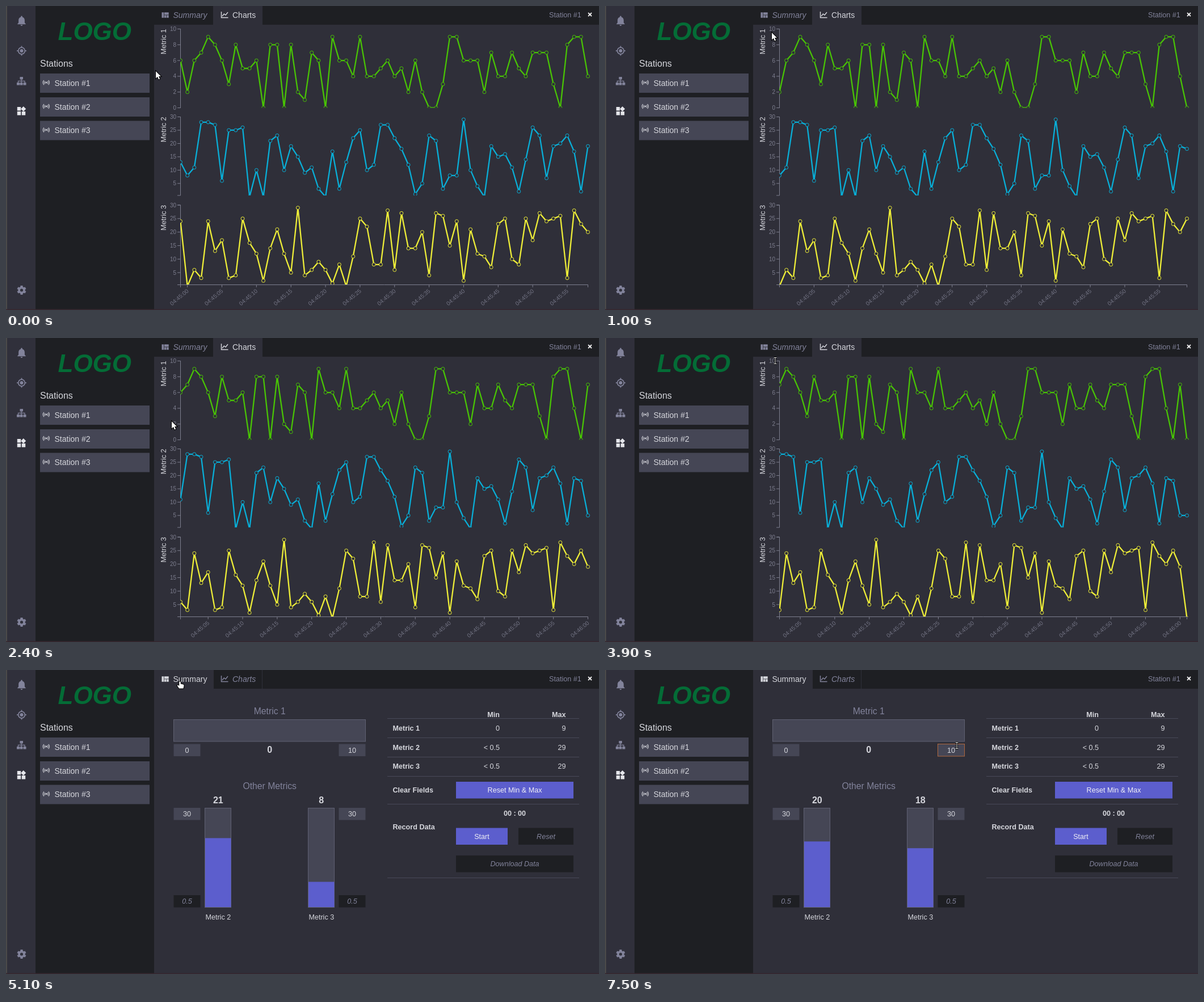
These frames come from a looping animation (1045x536 px, 8000 ms). An HTML page with a canvas:

```html
<!DOCTYPE html>
<html lang="en">
<head>
<meta charset="utf-8">
<title>Station dashboard</title>
<style>
  html, body { margin: 0; width: 100%; height: 100%; overflow: hidden; background: #2f2f39; }
  canvas { display: block; width: 1045px; height: 536px; }
</style>
</head>
<body>
<canvas id="stage" width="1045" height="536"></canvas>
<script>
const ctx = document.getElementById('stage').getContext('2d');
const LOOP = 8000, STEP = 100, SUMMARY_AT = 5100;
const FONT = '"Liberation Sans", Arial, sans-serif';
const BG = '#2f2f39', DARK = '#1e1f23', SLATE = '#454655', EDGE = '#5f6072',
      TEXT = '#d6d7dd', MUTED = '#82839b', AXIS = '#7d7e8e', PURPLE = '#5c5ecd';

// One reading per second, starting at 04:44:59
const metric1 = [6,2,6,7,9,8,6,3,8,5,5,6,0,8,8,0,8,2,1,7,6,0,9,6,6,4,9,4,4,5,6,4,
  5,2,6,2,0,0,3,9,9,6,6,6,2,7,4,4,7,5,4,7,7,7,3,0,8,9,9,4,0,7,0,4];
const metric2 = [13,8,11,28,28,27,6,25,25,26,0,10,0,21,23,10,19,15,9,11,3,0,17,3,13,22,25,10,12,27,27,22,
  18,12,1,5,23,21,3,8,8,29,10,4,0,19,15,16,11,2,14,26,23,7,19,20,23,17,2,19,18,5,5,19];
const metric3 = [24,0,6,3,24,13,17,3,4,25,16,12,2,14,21,12,5,29,4,6,9,6,1,8,0,11,25,22,8,8,28,6,
  27,14,14,20,4,27,26,15,24,2,21,12,11,7,23,25,10,8,25,17,27,24,25,26,3,28,23,20,25,19,0,17];
const charts = [
  { name: 'Metric 1', data: metric1, color: '#48c404', top: 40.5, bottom: 179.5, min: 0, max: 10, step: 2 },
  { name: 'Metric 2', data: metric2, color: '#08afd8', top: 195.5, bottom: 334, min: 0.5, max: 30, step: 5 },
  { name: 'Metric 3', data: metric3, color: '#eeee38', top: 351, bottom: 491.5, min: 0.5, max: 30, step: 5 }
];
const shifts = [1000, 2000, 3900, 4300];
const LEFT = 307.5, RIGHT = 1025.5, COUNT = 60, DX = (RIGHT - LEFT) / (COUNT - 1);

// time, x, y, pointer shape from here on
const pointer = [
  [0, 264, 115, arrow], [300, 264, 115, arrow], [1000, 294, 47, arrow], [1200, 298, 39, arrow],
  [1300, 298, 39, arrow], [2200, 289, 171, arrow], [2400, 292, 147, arrow], [3800, 292, 147, arrow],
  [3900, 300, 40, beam], [4100, 304, 31, hand], [4400, 305.5, 22.5, hand], [5000, 305.5, 22.5, hand],
  [5100, 306.5, 20, hand], [5200, 306.5, 20, arrow], [5400, 310, 52, arrow], [5500, 310, 52, arrow],
  [5700, 479, 88, arrow], [5800, 479, 88, arrow], [5900, 571, 112, arrow], [6000, 571, 112, arrow],
  [6300, 616, 141, beam], [6400, 616, 141, beam], [6500, 617, 142, beam], [7400, 617, 142, beam],
  [7500, 620, 133, beam], [LOOP, 620, 133, beam]
];

function rect(x, y, w, h, fill, stroke) {
  if (fill) { ctx.fillStyle = fill; ctx.fillRect(x, y, w, h); }
  if (stroke) { ctx.strokeStyle = stroke; ctx.lineWidth = 1; ctx.strokeRect(x, y, w, h); }
}

function text(s, x, y, size, color, align = 'left', style = '') {
  ctx.font = `${style} ${size}px ${FONT}`;
  ctx.fillStyle = color;
  ctx.textAlign = align;
  ctx.fillText(s, x, y);
}

function turned(s, x, y, angle, size, color, baseline) {
  ctx.save();
  ctx.translate(x, y);
  ctx.rotate(angle);
  ctx.textBaseline = baseline;
  text(s, 0, 0, size, color, 'right');
  ctx.restore();
}

function line(points, color, width = 1) {
  ctx.beginPath();
  points.forEach(([x, y]) => ctx.lineTo(x, y));
  ctx.strokeStyle = color;
  ctx.lineWidth = width;
  ctx.stroke();
}

function arc(x, y, r, color, width, from = 0, to = Math.PI * 2) {
  ctx.beginPath();
  ctx.arc(x, y, r, from, to);
  ctx.strokeStyle = color;
  ctx.lineWidth = width;
  ctx.stroke();
}

function dot(x, y, r, color) {
  ctx.beginPath();
  ctx.arc(x, y, r, 0, Math.PI * 2);
  ctx.fillStyle = color;
  ctx.fill();
}

function shape(d, x, y, scale, fill, stroke) {
  const path = new Path2D(d);
  ctx.save();
  ctx.translate(x, y);
  ctx.scale(scale, scale);
  if (stroke) { ctx.strokeStyle = stroke; ctx.lineWidth = 2; ctx.stroke(path); }
  ctx.fillStyle = fill;
  ctx.fill(path);
  ctx.restore();
}

function arrow(x, y) {
  shape('M0 0V12.5L3 9.8L5 14.5L7.1 13.5L5.1 9H9Z', x, y, 1, '#fff', '#000');
}

function hand(x, y) {
  shape('M-1.3 1Q0 -.6 1.3 1V4.5L6 5.5Q7.2 6 7 8L6 12.5H-1.5L-4.6 7.8Q-4.6 6 -3 6.7L-1.3 8Z', x, y, 1, '#fff', '#000');
}

function beam(x, y) {
  const stem = [[x, y - 5], [x, y + 5]];
  const caps = [y - 5.5, y + 5.5].map(v => [[x - 2.5, v], [x + 2.5, v]]);
  [['#000', 3], ['#e8e8e8', 1]].forEach(([color, w]) => [stem, ...caps].forEach(p => line(p, color, w)));
}

function navIcons() {
  shape('M12 22c1.1 0 2-.9 2-2h-4c0 1.1.9 2 2 2zm6-6v-5c0-3.1-1.6-5.6-4.5-6.3V4c0-2-3-2-3 0v.7C7.6 5.4 6 7.9 6 11v5l-2 2v1h16v-1z',
    16.7, 15.2, 0.9, MUTED);

  arc(27.5, 79, 5.8, MUTED, 1.7);
  dot(27.5, 79, 3, MUTED);
  [[1, 0], [-1, 0], [0, 1], [0, -1]].forEach(([a, b]) =>
    line([[27.5 + a * 5.5, 79 + b * 5.5], [27.5 + a * 8.5, 79 + b * 8.5]], MUTED, 1.7));

  rect(24.5, 125, 5.5, 4.5, MUTED);
  [19, 24.5, 30.5].forEach(x => rect(x, 135, 5, 4.5, MUTED));
  line([[21.5, 135], [21.5, 132.3], [33, 132.3], [33, 135]], MUTED, 1.3);
  line([[27.2, 129], [27.2, 135]], MUTED, 1.3);

  shape('M13 13v8h8v-8zM3 21h8v-8H3zM3 3v8h8V3zM16.7 1.7L11 7.3 16.7 13l5.6-5.7z', 17.4, 175.6, 0.8, '#e4e5ea');

  arc(27.5, 501, 4.4, MUTED, 3.6);
  for (let i = 0; i < 6; i++) {
    const a = i * Math.PI / 3 + Math.PI / 6, c = Math.cos(a), s = Math.sin(a);
    line([[27.5 + c * 5, 501 + s * 5], [27.5 + c * 8, 501 + s * 8]], MUTED, 4.2);
  }
}

function frame() {
  rect(0, 0, 1045, 536, BG);
  rect(0, 0, 52, 536, '#30303b');
  rect(52, 0, 209, 536, DARK);
  navIcons();
  text('LOGO', 91.5, 60, 44, '#046c36', 'left', 'italic bold');
  text('Stations', 60, 107, 16, TEXT);
  [119, 161, 202.5].forEach((y, i) => {
    rect(60, y, 193, 34, SLATE);
    text(`Station #${i + 1}`, 85.5, y + 21.5, 14, TEXT);
    const cy = y + 16;
    dot(70.8, cy, 1.4, TEXT);
    [3.2, 5.6].forEach(r => [0, Math.PI].forEach(a => arc(70.8, cy, r, TEXT, 1.1, a - 0.8, a + 0.8)));
  });
}

function tabs(summary) {
  rect(261, 0, 784, 33, DARK);
  if (summary) {
    rect(261, 0, 105, 33, BG);
    rect(451, 0, 1, 33, BG);
  } else {
    rect(365, 0, 87, 33, BG);
  }
  const first = summary ? TEXT : MUTED, second = summary ? MUTED : TEXT;
  shape('M4 5h5v13H4zM10 5h11v6H10zM10 12h5v6h-5zM16 12h5v6h-5z', 271.6, 7.7, 0.72, first);
  text('Summary', 294.5, 21, 14, first, 'left', summary ? '' : 'italic');
  line([[379.5, 10], [379.5, 20.5], [391.5, 20.5]], second, 1.4);
  line([[381, 18], [384.3, 14], [387, 16], [391, 11]], second, 1.4);
  text('Charts', 399, 21, 14, second, 'left', summary ? 'italic' : '');
  text('Station #1', 957, 19.5, 12.6, MUTED);
  line([[1026, 12], [1032, 18]], '#eee', 1.8);
  line([[1032, 12], [1026, 18]], '#eee', 1.8);
}

function drawChart({ name, data, color, top, bottom, min, max, step }, shift) {
  const yOf = v => bottom - (v - min) / (max - min) * (bottom - top);
  turned(name, 281.5, top, -Math.PI / 2, 12.6, TEXT, 'alphabetic');
  line([[302, top], [LEFT, top], [LEFT, bottom], [302, bottom]], AXIS);
  for (let v = min ? step : 0; v <= max; v += step) {
    line([[302, yOf(v)], [LEFT, yOf(v)]], AXIS);
    text(v, 300, yOf(v) + 3.5, 10, AXIS, 'right');
  }
  const points = data.slice(shift, shift + COUNT).map((v, i) => [LEFT + i * DX, yOf(v)]);
  ctx.save();
  ctx.beginPath();
  ctx.rect(LEFT - 0.5, top - 6, RIGHT - LEFT + 6, bottom - top + 6);
  ctx.clip();
  ctx.lineJoin = 'round';
  line(points, color, 2.3);
  points.forEach(([x, y]) => {
    dot(x, y, 3, BG);
    arc(x, y, 3, color, 1);
  });
  ctx.restore();
}

function chartsPage(t) {
  const shift = shifts.filter(s => t >= s).length;
  charts.forEach(c => drawChart(c, shift));
  line([[LEFT, 496], [LEFT, 491.5], [RIGHT, 491.5], [RIGHT, 496]], AXIS);
  for (let s = 0; s <= 60; s += 5) {
    const i = s + 1 - shift;
    if (i <= 0 || i >= COUNT) continue;
    const x = LEFT + i * DX;
    line([[x, 491.5], [x, 496]], AXIS);
    const label = s < 60 ? '04:45:' + String(s).padStart(2, '0') : '04:46:00';
    turned(label, x + 1, 501.5, -40 * Math.PI / 180, 10, '#727383', 'middle');
  }
}

function field(s, x, y, off) {
  rect(x, y, 47, 21.5, off ? DARK : SLATE);
  text(s, x + 23.5, y + 15, 12.6, off ? MUTED : TEXT, 'center', off ? 'italic' : '');
}

function button(s, x, y, w, off) {
  rect(x, y, w, 29.5, off ? DARK : PURPLE);
  text(s, x + w / 2, y + 19, 12.6, off ? MUTED : '#f0f0f6', 'center', off ? 'italic' : '');
}

function gauge(name, value, x) {
  const h = (value - 0.5) / 29.5 * 175;
  rect(x, 243.5, 46, 175, SLATE, EDGE);
  rect(x + 0.5, 418 - h, 45.5, h, PURPLE);
  text(value, x + 23.3, 234.5, 16, TEXT, 'center', 'bold');
  text(name, x + 23.3, 440, 12.6, TEXT, 'center');
}

function summaryPage(t) {
  const [a, b, c] = t < 5900 ? [0, 21, 8] : t < 7500 ? [4, 20, 24] : [0, 20, 18];
  text('Metric 1', 464.7, 78, 15.75, MUTED, 'center');
  rect(295.5, 87.5, 338, 38.5, SLATE, EDGE);
  // This bar grows from its middle
  rect(464.5, 88, a / 10 * 169, 37.5, PURPLE);
  field('0', 295.5, 130.5);
  field('10', 586.5, 130.5);
  if (t >= 7500) rect(586.5, 130.5, 47, 21.5, null, '#b0683e');
  text(a, 464.7, 146, 16, TEXT, 'center', 'bold');

  text('Other Metrics', 464.7, 210, 15.75, MUTED, 'center');
  [295.5, 586.5].forEach(x => {
    field('30', x, 243);
    field('0.5', x, 397, true);
  });
  gauge('Metric 2', b, 350.5);
  gauge('Metric 3', c, 532.5);

  [85, 119, 153, 187, 236, 366].forEach(y => rect(672, y, 338, 1, '#484958'));
  text('Min', 870, 83, 12.6, TEXT, 'right', 'bold');
  text('Max', 986.5, 83, 12.6, TEXT, 'right', 'bold');
  [['0', 9], ['< 0.5', 29], ['< 0.5', 29]].forEach(([lo, hi], i) => {
    const y = 107 + i * 33.7;
    text(`Metric ${i + 1}`, 681.5, y, 12.6, TEXT, 'left', 'bold');
    text(lo, 870, y, 12.6, TEXT, 'right');
    text(hi, 986.5, y, 12.6, TEXT, 'right');
  });
  text('Clear Fields', 681.5, 216, 12.6, TEXT, 'left', 'bold');
  button('Reset Min & Max', 793, 197, 207);
  text('00 : 00', 896.5, 257, 12.6, TEXT, 'center', 'bold');
  text('Record Data', 681.5, 281, 12.6, TEXT, 'left', 'bold');
  button('Start', 793, 278.5, 91);
  button('Reset', 903, 278.5, 97, true);
  button('Download Data', 793, 327, 207, true);
}

function drawPointer(t) {
  const i = pointer.findLastIndex(k => k[0] <= t);
  const [t0, x0, y0, draw] = pointer[i], [t1, x1, y1] = pointer[i + 1];
  const p = (t - t0) / (t1 - t0);
  draw(x0 + (x1 - x0) * p, y0 + (y1 - y0) * p);
}

function render(now) {
  const t = Math.floor(now % LOOP / STEP) * STEP;
  const summary = t >= SUMMARY_AT;
  frame();
  tabs(summary);
  (summary ? summaryPage : chartsPage)(t);
  rect(0, 0, 2, 536, '#4b4a4a');
  rect(0, 534.5, 1045, 1.5, '#36272f');
  drawPointer(t);
}

const start = performance.now();
function tick() {
  render(performance.now() - start);
  requestAnimationFrame(tick);
}
tick();
</script>
</body>
</html>
```
